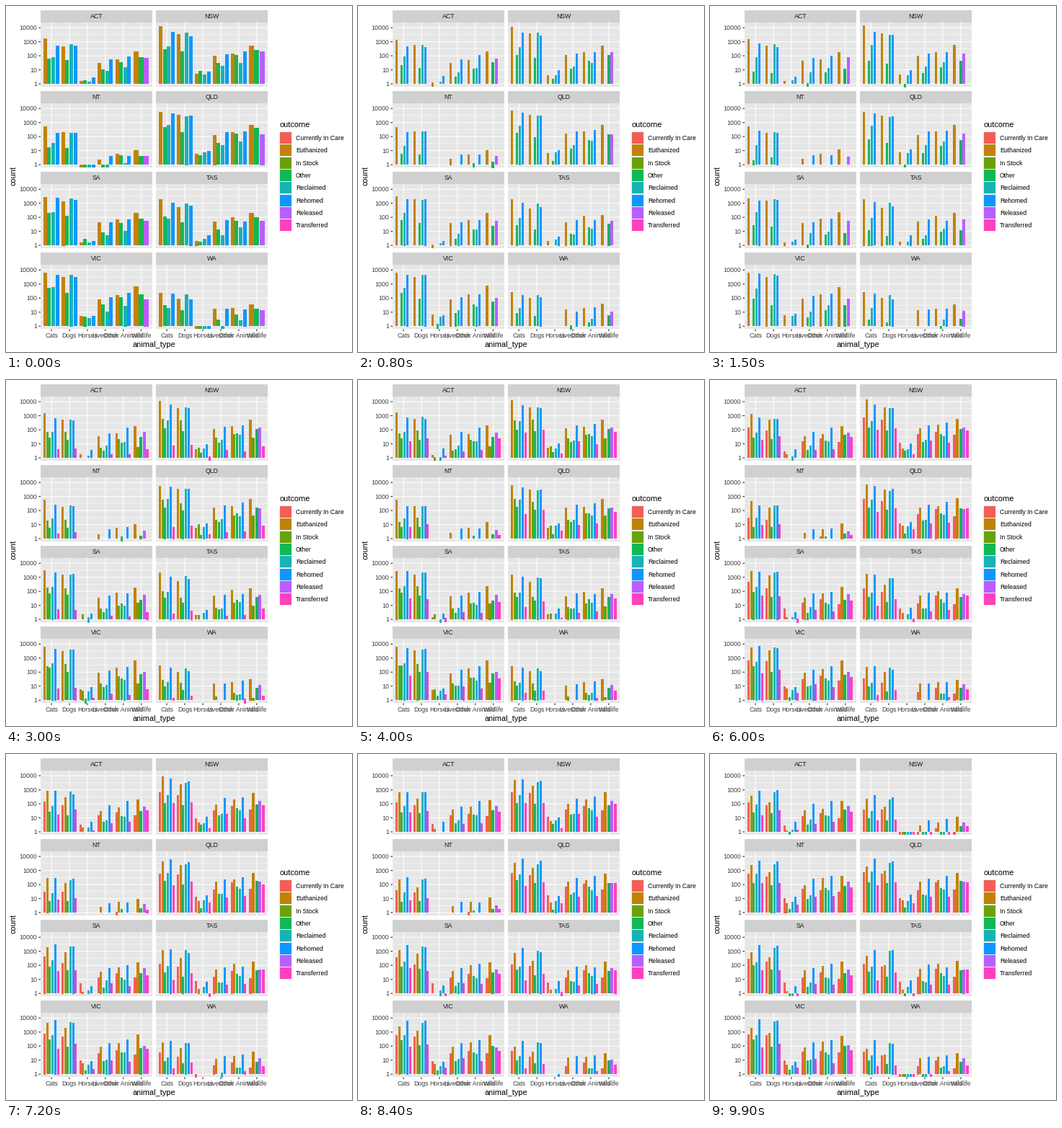
A matplotlib script for the animation above (10 s loop, 480 by 480 pixels).

```python
import numpy as np
import matplotlib.pyplot as plt
from matplotlib.animation import FuncAnimation
from matplotlib.collections import PolyCollection
from matplotlib.patches import Rectangle

SIZE, DPI, FRAMES = 480, 80, 100
PT = 72 / DPI
YEARS = 20
plt.rcParams["font.family"] = "Liberation Sans"

OUTCOMES = {
    "Currently In Care": "#F35E5A", "Euthanized": "#C08308",
    "In Stock": "#67A306", "Other": "#14B656",
    "Reclaimed": "#17B3B7", "Rehomed": "#1096FF",
    "Released": "#B95EFF", "Transferred": "#FF40BF",
}
COLORS = list(OUTCOMES.values())
CARE, EUTH, STOCK, OTHER, RECLAIM, REHOME, RELEASE, TRANSFER = range(8)

# Typical log10 count of each outcome
ANIMALS = {
    "Cats": [2.4, 3.4, 2.1, 1.75, 2.15, 3.2, 0, 1.4],
    "Dogs": [2.2, 3.05, 2.1, 1.5, 3.05, 3.1, 0, 1.7],
    "Horses": [0.8, 0.4, 0.45, 0.05, 0.5, 0.8, 0, 0.2],
    "Livestock": [1.35, 1.75, 1.0, 0.8, 1.0, 2.0, 0, 0.8],
    "Other Animals": [1.6, 2.0, 1.3, 1.4, 1.3, 2.2, 0, 0.8],
    "Wildlife": [1.2, 2.4, 1.1, 1.7, 0, 0, 1.9, 1.6],
}
# Log10 size of a region: (cats and dogs, all other animals)
REGIONS = {
    "ACT": (-0.25, -0.15), "NSW": (0.5, 0.3), "NT": (-0.7, -1.3),
    "QLD": (0.55, 0.4), "SA": (0.1, -0.15), "TAS": (-0.2, -0.1),
    "VIC": (0.5, 0.2), "WA": (-0.9, -0.8),
}

# Outcomes side by side in each reporting scheme: (ordinary animals, wildlife)
LAYOUTS = [
    ([EUTH, OTHER, RECLAIM, REHOME], [EUTH, OTHER, RELEASE]),
    ([EUTH, STOCK, OTHER, RECLAIM, REHOME, TRANSFER],
     [EUTH, STOCK, OTHER, RELEASE, TRANSFER]),
    ([CARE, EUTH, OTHER, RECLAIM, REHOME, TRANSFER],
     [CARE, EUTH, OTHER, RELEASE, TRANSFER]),
]
RELAYOUT = 9  # year in which the last scheme starts to slide in

# Panel geometry in pixels
LEFT, PANEL_W, COL_STEP = 48.1, 154.6, 160.1
TOP, STRIP_H, PANEL_H, ROW_STEP = 5.5, 17.1, 89.5, 112.07
DECADE, BASE = 19.48, 102.5
UNIT = PANEL_W / 6.2


def make_counts():
    """Log10 counts by year, region, animal and outcome."""
    rng = np.random.default_rng(7)
    year = np.arange(YEARS)
    profile = np.array(list(ANIMALS.values()))
    size = np.array(list(REGIONS.values()))[:, [0, 0, 1, 1, 1, 1]]
    level = np.repeat(size[None], YEARS, axis=0)
    level[-1, [1, 2]] = level[-1, [2, 1]]  # NSW and NT trade places at the end

    v = profile + level[..., None]
    v += rng.normal(0, 0.1, v.shape[1:]) + rng.normal(0, 0.06, v.shape)

    def trend(years, values):
        return np.interp(year, years, values)[:, None, None]

    v[:, :, :2, EUTH] += trend([11, 19], [0, -0.6])
    v[..., REHOME] += trend([0, 19], [-0.1, 0.1])
    v[..., OTHER] += trend([0, 3, 6], [0.4, -0.5, 0])
    v[..., STOCK] *= trend([3, 5], [0, 1])
    v[..., TRANSFER] *= trend([4, 8], [0, 1])
    return np.where(v < 0.1, 0, v)


counts = make_counts()


def slots(layout):
    """Left offset and width of each outcome, as (animal kind, outcome, 2)."""
    out = np.full((2, len(OUTCOMES), 2), np.nan)
    for kind, order in enumerate(layout):
        w = 0.9 * UNIT / len(order)
        for i, o in enumerate(order):
            out[kind, o] = i * w - 0.45 * UNIT, w
    return out


first, middle, last = (slots(l) for l in LAYOUTS)
middle = np.where(np.isnan(middle), last, middle)
first = np.where(np.isnan(first), middle, first)
last = np.where(np.isnan(last), middle, last)


def placement(t):
    a, b = np.clip([t, t - RELAYOUT], 0, 1)
    return first + (middle - first) * a + (last - middle) * b


def tween(t):
    """Bar heights, and which bars reach down to the panel floor."""
    k = min(int(t), YEARS - 2)
    u = t - k
    zero0, zero1 = counts[k] == 0, counts[k + 1] == 0
    h = counts[k] * (1 - u) + counts[k + 1] * u
    if u in (0, 1):
        return h, zero1 if u else zero0
    drop = zero0 != zero1
    if k in (0, YEARS - 2):
        drop |= zero0 & zero1
    return h, drop


def corner(r):
    return LEFT + r % 2 * COL_STEP, TOP + r // 2 * ROW_STEP


def center(a):
    return (a + 0.6) * UNIT


def snap(x, y, w, h):
    """Whole-pixel rectangle: rounded corner, truncated size."""
    return round(x), round(y), int(w), int(h)


def bars(f):
    t = f * (YEARS - 1) / (FRAMES - 1)
    place = placement(t)
    heights, drops = tween(t)
    layout = LAYOUTS[0 if t < 1 else 1 if t < RELAYOUT + 0.5 else 2]
    verts, colors = [], []
    for r in range(len(REGIONS)):
        x0, y0 = corner(r)
        base, floor = y0 + BASE, y0 + STRIP_H + PANEL_H
        for a in range(len(ANIMALS)):
            kind = int(a == 5)
            for o in layout[kind]:
                dx, w = place[kind, o]
                top = base - heights[r, a, o] * DECADE
                low = floor if drops[r, a, o] else base
                x, y, w, h = snap(x0 + center(a) + dx, top, w, low - top + 0.5)
                verts.append([(x, y), (x + w, y), (x + w, y + h), (x, y + h)])
                colors.append(COLORS[o])
    return verts, colors


fig = plt.figure(figsize=(SIZE / DPI, SIZE / DPI), dpi=DPI, facecolor="white")
ax = fig.add_axes([0, 0, 1, 1])
ax.set(xlim=(0, SIZE), ylim=(SIZE, 0))
ax.axis("off")


def box(x, y, w, h, color):
    ax.add_patch(Rectangle((x, y), w, h, fc=color, lw=0, zorder=0))


def line(x, y, color="white", w=1.07):
    ax.plot(x, y, color=color, lw=w * PT, solid_capstyle="butt",
            snap=False, zorder=1)


def label(x, y, s, size=8.8, color="black", ha="center", rotation=0):
    ax.text(x, y, s, size=size * PT, color=color, ha=ha, va="baseline",
            rotation=rotation, rotation_mode="anchor", zorder=4)


AXIS, TICK = "#404040", "#282828"

for r, name in enumerate(REGIONS):
    x0, y0 = corner(r)
    x1, top, floor = x0 + PANEL_W, y0 + STRIP_H, y0 + STRIP_H + PANEL_H
    box(x0, y0, PANEL_W, STRIP_H, "#D0D0D0")
    box(x0, top, PANEL_W, PANEL_H, "#E6E6E6")
    label((x0 + x1) / 2, y0 + 11.6, name, color="#141414")
    for p in range(5):
        y = y0 + BASE - p * DECADE
        line([x0, x1], [y, y])
        if p < 4:
            line([x0, x1], [y - DECADE / 2] * 2, w=0.53)
        if r % 2 == 0:
            line([x0 - 2.75, x0], [y, y], TICK)
            label(x0 - 4.9, y + 3.15, str(10 ** p), color=AXIS, ha="right")
    for a, animal in enumerate(ANIMALS):
        x = x0 + center(a)
        line([x, x], [top, floor])
        if r >= 6:
            line([x, x], [floor, floor + 2.75], TICK)
            label(x, 460.4, animal, color=AXIS)

label(205.5, 472.7, "animal_type", 11)
label(13.5, 235.5, "count", 11, rotation=90)
label(379.3, 167.7, "outcome", 11, ha="left")

KEY = 17.28
for i, (name, color) in enumerate(OUTCOMES.items()):
    y = 174.4 + i * KEY
    box(379.3, y, KEY, KEY, "#EFEFEF")
    box(*snap(380, y + 0.7, 16, 16), color)
    label(402, y + KEY / 2 + 3.15, name, ha="left")

chart = PolyCollection([], edgecolors="none", linewidths=0, zorder=3)
ax.add_collection(chart, autolim=False)


def update(f):
    verts, colors = bars(f)
    chart.set_verts(verts)
    chart.set_facecolor(colors)
    return [chart]


anim = FuncAnimation(fig, update, frames=FRAMES, interval=100,
                     init_func=lambda: update(0), repeat=True, repeat_delay=0)
plt.show()
```
